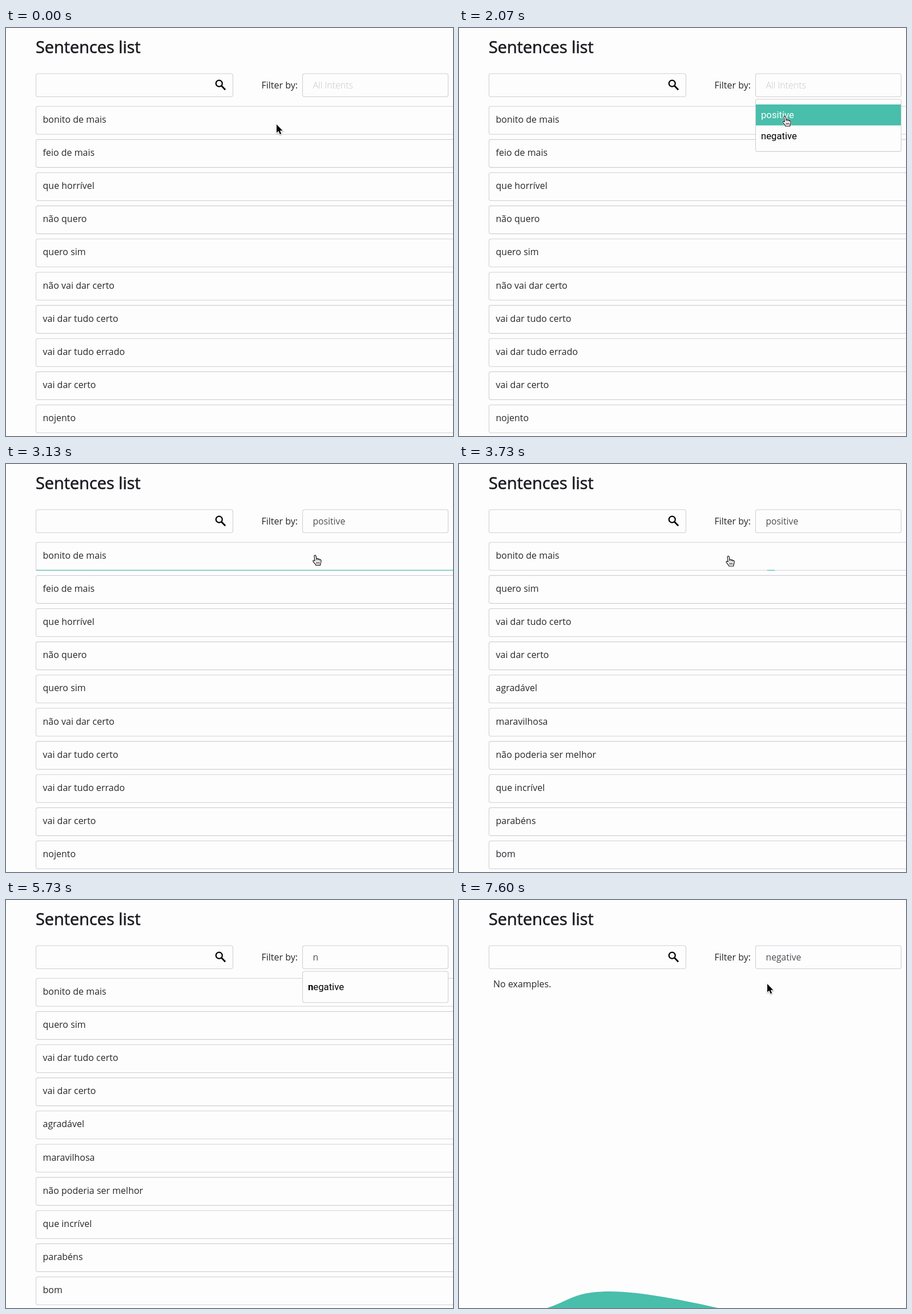
An HTML page with a canvas for the animation above (8 s loop, 783 by 715 pixels).

```html
<!DOCTYPE html>
<html lang="en">
<head>
<meta charset="utf-8">
<title>Sentences list</title>
<style>
  html, body { margin: 0; width: 100%; height: 100%; overflow: hidden; background: #fefdfe; }
  canvas { display: block; }
</style>
</head>
<body>
<canvas id="stage" width="783" height="715"></canvas>
<script>
const ctx = document.getElementById('stage').getContext('2d');
const LOOP = 8000;
const TEAL = '#48beab', INK = '#26282b', PAPER = '#fefdfe', BORDER = '#cfcfd3';
const BODY = '16px "Open Sans", sans-serif';
const VALUE = '15.7px "Open Sans", sans-serif';
const LIGHT = '300 15.9px "Open Sans", sans-serif';
const TITLE = '28.9px "Open Sans", sans-serif';
const MENU = '16.7px Roboto, sans-serif';

const ALL = ['bonito de mais', 'feio de mais', 'que horrível', 'não quero', 'quero sim',
  'não vai dar certo', 'vai dar tudo certo', 'vai dar tudo errado', 'vai dar certo', 'nojento'];
const POSITIVE = ['bonito de mais', 'quero sim', 'vai dar tudo certo', 'vai dar certo', 'agradável',
  'maravilhosa', 'não poderia ser melhor', 'que incrível', 'parabéns', 'bom'];

// Pointer path: time, x, y of the hotspot
const PATH = [
  [70, 474, 169], [560, 565, 91], [840, 553, 102], [1900, 553, 102], [2070, 571, 155],
  [2300, 567, 160], [2670, 563, 159], [2900, 558, 160], [3730, 472, 162], [4200, 488, 160],
  [4460, 535, 131], [4560, 546, 108], [4730, 550, 103], [6900, 550, 103], [7120, 549, 152],
  [7400, 544, 149], [7600, 540, 147]
];
const CLICKS = [[1200, 1390], [2400, 2560], [4860, 4990], [5130, 5250], [7210, 7340]];

const within = (t, from, to) => t >= from && t < to;
const clamp = v => Math.min(1, Math.max(0, v));
const ramp = (t, start, length) => clamp((t - start) / length);

function pointerAt(t) {
  const next = PATH.findIndex(p => p[0] > t);
  if (next === 0) return PATH[0].slice(1);
  if (next < 0) return PATH[PATH.length - 1].slice(1);
  const [t0, x0, y0] = PATH[next - 1], [t1, x1, y1] = PATH[next];
  const u = (t - t0) / (t1 - t0), k = u * u * (3 - 2 * u);
  return [x0 + (x1 - x0) * k, y0 + (y1 - y0) * k];
}

function text(str, x, y, font = BODY, color = INK) {
  ctx.font = font;
  ctx.fillStyle = color;
  ctx.fillText(str, x, y);
}

function box(x, y, w, h) {
  ctx.beginPath();
  ctx.roundRect(x, y, w, h, 3.5);
  ctx.fillStyle = PAPER;
  ctx.fill();
  ctx.lineWidth = 1.1;
  ctx.strokeStyle = BORDER;
  ctx.stroke();
}

function drawHeader() {
  text('Sentences list', 52, 44, TITLE, '#1b1c20');
  // A hairline outline gives the title its medium weight
  ctx.strokeStyle = '#1b1c20';
  ctx.lineWidth = 0.6;
  ctx.strokeText('Sentences list', 52, 44);
  box(52.5, 80, 345, 40.5);
  ctx.strokeStyle = '#000';
  ctx.lineWidth = 2.2;
  ctx.beginPath();
  ctx.arc(373.3, 97.2, 5.5, 0, Math.PI * 2);
  ctx.stroke();
  ctx.lineWidth = 2.7;
  ctx.beginPath();
  ctx.moveTo(377.3, 101.3);
  ctx.lineTo(384.2, 108.2);
  ctx.stroke();
  text('Filter by:', 447.5, 106);
}

function drawRows(rows) {
  rows.forEach((label, i) => {
    const y = 137.2 + i * 58.15;
    box(52.5, y, 988, 49);
    text(label, 64.5, y + 28.6);
  });
}

function drawUnderline(t) {
  const share = t < 3300 ? ramp(t, 2586, 300)
    : ramp(t, 3727, 300) - ramp(t, 4455, 275);
  const half = 494 * share;
  ctx.fillStyle = TEAL;
  ctx.fillRect(546.5 - half, 185.7, half * 2, 1.1);
}

function drawEmpty() {
  text('No examples.', 60, 153);
  ctx.fillStyle = TEAL;
  ctx.beginPath();
  ctx.moveTo(154, 715);
  ctx.bezierCurveTo(175, 708, 185, 702, 200, 696);
  ctx.bezierCurveTo(220, 688, 242, 686, 265, 686);
  ctx.bezierCurveTo(320, 686, 400, 703, 454, 715);
  ctx.fill();
}

function drawList(t) {
  if (t < 3350) drawRows(ALL);
  else if (within(t, 3690, 6240)) drawRows(POSITIVE);
  else if (t >= 6440) drawEmpty();
  if (t < 3350 || within(t, 3690, 4740)) drawUnderline(t);
}

function drawFilter(t) {
  box(519.5, 80, 255, 40.5);
  if (within(t, 5190, 5725)) {
    ctx.fillStyle = '#b4d7fd';
    ctx.fillRect(537, 89, 57, 22);
  }
  if (t < 2560) text('All Intents', 537.5, 106, LIGHT, '#c4c4c8');
  else text(t < 5725 ? 'positive' : t < 7340 ? 'n' : 'negative', 537.5, 106, VALUE, '#4c4e52');
  if (within(t, 6000, 6500) || within(t, 7000, 7340)) {
    ctx.fillStyle = '#222';
    ctx.fillRect(547, 89, 1, 22);
  }
}

// Each item is [bold part, plain part]
function drawMenu(items, active) {
  box(519.5, 125, 255, 18 + items.length * 36.7);
  items.forEach(([bold, plain], i) => {
    const y = 134 + i * 36.7, color = i === active ? '#fff' : '#000';
    if (i === active) {
      ctx.fillStyle = TEAL;
      ctx.fillRect(520, y, 254, 36.7);
    }
    text(bold, 529, y + 24.4, 'bold ' + MENU, color);
    const shift = ctx.measureText(bold).width;
    text(plain, 529 + shift, y + 24.4, MENU, color);
  });
}

function menuAt(t) {
  if (within(t, 1270, 2560)) return [['', 'positive'], ['', 'negative']];
  if (within(t, 4930, 5725)) return [['positive', '']];
  if (within(t, 5725, 7340)) return [['n', 'egative']];
  return null;
}

function drawArrow(x, y) {
  ctx.save();
  ctx.translate(x, y);
  ctx.shadowColor = 'rgba(0,0,0,.35)';
  ctx.shadowBlur = 2;
  ctx.shadowOffsetY = 1;
  const p = new Path2D('M0 0V14.5L3.4 11.5L5.9 17.2L8.2 16.2L5.8 10.7H10.4Z');
  ctx.strokeStyle = '#fff';
  ctx.lineWidth = 2;
  ctx.stroke(p);
  ctx.shadowColor = 'transparent';
  ctx.fillStyle = '#000';
  ctx.fill(p);
  ctx.restore();
}

function drawHand(x, y) {
  ctx.save();
  ctx.translate(x, y);
  const p = new Path2D('M-1.8 1C-1.8 -1.1 1 -1.1 1.3 1L2 5.8C3 4.8 4.7 5.2 4.9 6.5' +
    'C6 5.6 7.4 6.2 7.6 7.3C9 6.7 10.2 7.5 10.2 9C10.2 12 9.2 13 8.8 17H1' +
    'C0 14.5 -2.3 12.7 -3.8 10.2C-4.6 8.6 -2.4 7.4 -.7 9.6Z');
  ctx.lineJoin = 'round';
  ctx.strokeStyle = 'rgba(255,255,255,.8)';
  ctx.lineWidth = 2.6;
  ctx.stroke(p);
  ctx.fillStyle = '#fff';
  ctx.fill(p);
  ctx.strokeStyle = '#111';
  ctx.lineWidth = 1.2;
  ctx.stroke(p);
  ctx.lineWidth = 1;
  ctx.stroke(new Path2D('M2 5.8L2.3 8.6M4.9 6.5L5 8.8M7.6 7.3V9.2M2.2 11V14.5M4.5 11V14.5M6.8 11V14.5'));
  ctx.restore();
}

function drawBeam(x, y) {
  const p = new Path2D('M-3 -8Q0 -8 0 -5.5Q0 -8 3 -8M0 -5.5V5.5M-3 8Q0 8 0 5.5Q0 8 3 8M-2 2.5H2');
  ctx.save();
  ctx.translate(x, y);
  ctx.strokeStyle = '#fff';
  ctx.lineWidth = 2.4;
  ctx.stroke(p);
  ctx.strokeStyle = '#222';
  ctx.lineWidth = 1.1;
  ctx.stroke(p);
  ctx.restore();
}

function drawRing(x, y) {
  ctx.beginPath();
  ctx.arc(x, y, 15.5, 0, Math.PI * 2);
  ctx.fillStyle = 'rgba(255,255,255,.3)';
  ctx.fill();
  ctx.strokeStyle = '#000';
  ctx.lineWidth = 3;
  ctx.stroke();
}

function drawPointer(t, x, y, overMenu) {
  if (within(t, 5725, 6930)) return;
  if (CLICKS.some(([from, to]) => within(t, from, to))) drawRing(x, y);
  const overField = x > 519 && within(y, 80, 121);
  const overRow = within(t, 2560, 4730) && y > 137;
  if (overField) drawBeam(x, y);
  else if (overMenu || overRow) drawHand(x, y);
  else drawArrow(x, y);
}

function draw(t) {
  const [x, y] = pointerAt(t);
  const menu = menuAt(t);
  const overMenu = Boolean(menu) && y > 134;
  ctx.fillStyle = PAPER;
  ctx.fillRect(0, 0, 783, 715);
  drawHeader();
  drawList(t);
  drawFilter(t);
  if (menu) drawMenu(menu, overMenu ? 0 : -1);
  drawPointer(t, x, y, overMenu);
}

const start = performance.now();
function tick() {
  draw((performance.now() - start) % LOOP);
  requestAnimationFrame(tick);
}
tick();
</script>
</body>
</html>
```
